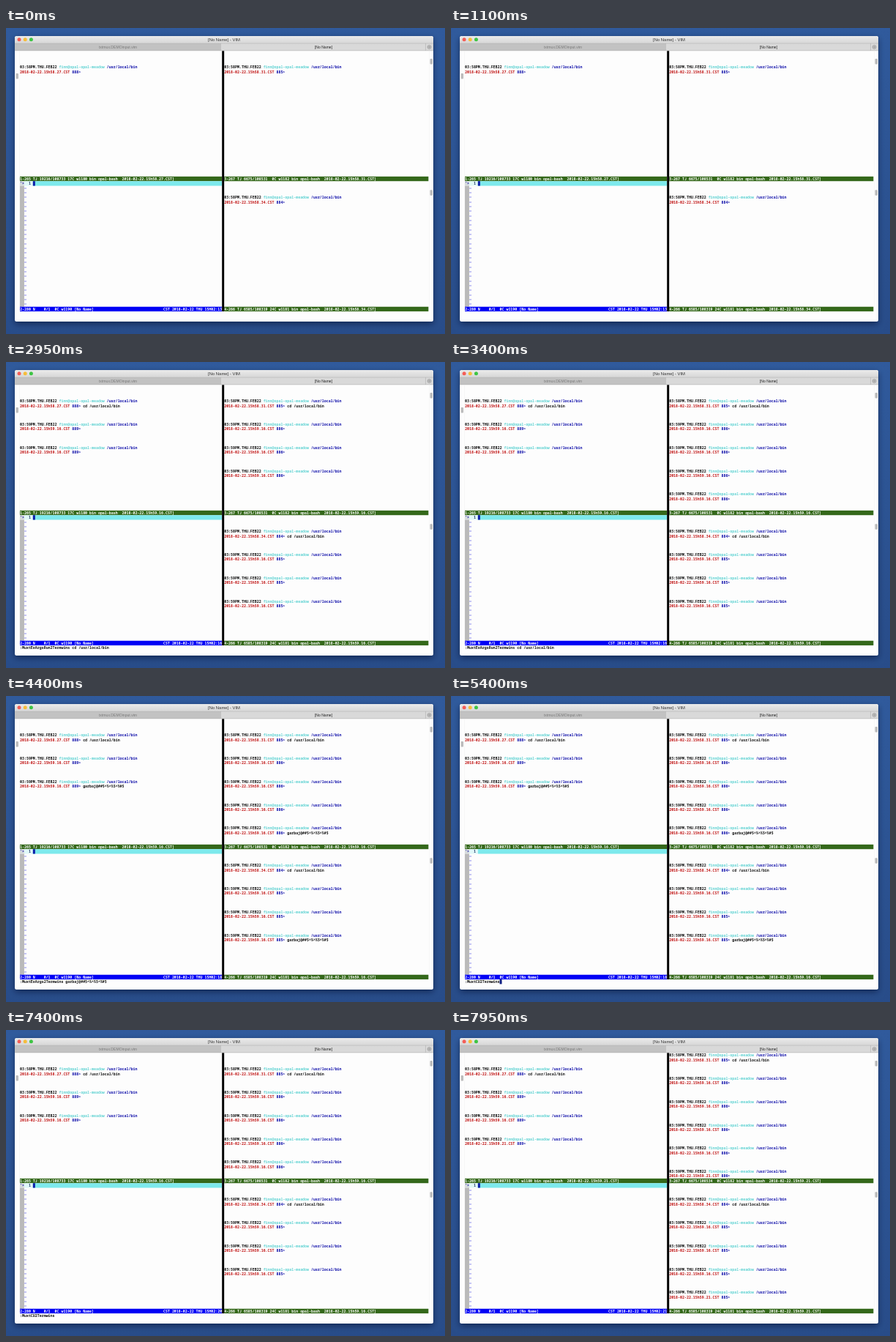
Animation, 600 px wide and 418 px high, one loop 8000 ms. Source, as an HTML page with a canvas:

```html
<!DOCTYPE html>
<html lang="en">
<head>
<meta charset="utf-8">
<title>Editor with terminal panes</title>
<style>
  html, body { margin: 0; width: 100%; height: 100%; overflow: hidden; background: #2b5191; }
  canvas { display: block; width: 600px; height: 418px; }
</style>
</head>
<body>
<canvas id="stage"></canvas>
<script>
const LOOP = 8000, W = 600, H = 418;
const CW = 2.97, RH = 6.354, X0 = 19, Y0 = 31.3;
const MONO = '"Noto Sans Mono", "DejaVu Sans Mono", monospace';
const SANS = '"Liberation Sans", Inter, sans-serif';
const GREEN = '#34681a', BLUE = '#0000f5', NAVY = '#0a0aa8', RED = '#c01212';
const PAPER = '#fdfdfd', INK = '#111';
const SPLIT = 93, RIGHT = 94, COLS = 188;
const EDIT_ROW = 28, BASE_ROW = 55, CMD_ROW = 56;
const USER = 'finn@opal-opal-meadow', SHELL = 'opal-bash', DIR = '/usr/local/bin';
const JUNK = 'garbaj@##$^%^%$^%#$';
const SENT = 2300, JUNK_ON = 4350, JUNK_OFF = 6100, ENTER = 7750;

// added: when each further prompt appears
const panes = [
  { col: 0, top: 0, bar: 27, num: 888, sec: 27, added: [2650, 2850, ENTER],
    info: () => '1-265 TJ 19216/108733 17C w1180' },
  { col: RIGHT, top: 0, bar: 27, num: 885, sec: 31, added: [2650, 2800, 2950, 3100, ENTER],
    info: t => `3-267 TJ 6675/${t < ENTER ? 108531 : 108534}  0C w1182` },
  { col: RIGHT, top: 28, bar: 55, num: 884, sec: 34, added: [2650, 2800, 2950, ENTER],
    info: () => '4-266 TJ 6585/108319 24C w1181' }
];

const commands = [
  { text: ':MuxtExArgsRun2Termwins cd ' + DIR, start: 1400, typed: 2200, run: SENT },
  { text: ':MuxtExArgs2Termwins ' + JUNK, start: 3550, typed: 4250, run: JUNK_ON },
  { text: ':MuxtCU2Termwins', start: 4850, typed: 5350, run: JUNK_OFF }
];

const clock = [[0, 13], [SENT, 16], [JUNK_ON, 18], [JUNK_OFF, 20], [ENTER, 21]];

const canvas = document.getElementById('stage');
const ctx = canvas.getContext('2d');
const dpr = window.devicePixelRatio || 1;
canvas.width = W * dpr;
canvas.height = H * dpr;

const colX = c => X0 + c * CW;
const rowY = r => Y0 + r * RH;

function box(x, y, w, h, color) {
  ctx.fillStyle = color;
  ctx.fillRect(x, y, w, h);
}

function cells(col, row, n, color, rows = 1) {
  box(colX(col), rowY(row), n * CW, rows * RH, color);
}

// Large font scaled down keeps the character grid exact.
function put(text, col, row, color) {
  ctx.save();
  ctx.translate(colX(col), rowY(row) + 4.95);
  ctx.scale(0.1, 0.1);
  ctx.font = `bold 49.5px ${MONO}`;
  ctx.textAlign = 'left';
  ctx.fillStyle = color;
  ctx.fillText(text, 0, 0);
  ctx.restore();
}

function label(text, x, y, size, color) {
  ctx.save();
  ctx.translate(x, y);
  ctx.scale(0.1, 0.1);
  ctx.font = `${size * 10}px ${SANS}`;
  ctx.textAlign = 'center';
  ctx.fillStyle = color;
  ctx.fillText(text, 0, 0);
  ctx.restore();
}

function disc(x, y, r, color) {
  ctx.fillStyle = color;
  ctx.beginPath();
  ctx.arc(x, y, r, 0, Math.PI * 2);
  ctx.fill();
}

function pill(x, y, w, h, r, color) {
  ctx.fillStyle = color;
  ctx.beginPath();
  ctx.roundRect(x, y, w, h, r);
  ctx.fill();
}

function fade(y0, y1, from, to) {
  const g = ctx.createLinearGradient(0, y0, 0, y1);
  g.addColorStop(0, from);
  g.addColorStop(1, to);
  return g;
}

function drawWindow() {
  box(0, 0, W, H, fade(0, H, '#305a9c', '#284c89'));
  ctx.save();
  ctx.shadowColor = 'rgba(0, 10, 40, 0.55)';
  ctx.shadowBlur = 9 * dpr;
  ctx.shadowOffsetY = 3 * dpr;
  pill(12, 11, 572, 390, 2.5, PAPER);
  ctx.restore();

  pill(12, 11, 572, 10.5, [2.5, 2.5, 0, 0], fade(11, 21, '#ebebeb', '#d6d6d6'));
  ['#f45e57', '#f6bd3b', '#3ec544'].forEach((c, i) => disc(18 + i * 8.2, 15.8, 2.5, c));
  label('[No Name] - VIM', 298, 17.8, 5.9, '#333');

  box(12, 21, 281, 10, '#c2c2c2');
  box(293, 21, 291, 10, '#d9d9d9');
  box(12, 20.8, 572, 0.5, '#adadad');
  box(12, 30.6, 572, 0.6, '#b0b0b0');
  box(293, 21, 0.5, 10, '#a8a8a8');
  box(573.5, 21, 0.5, 10, '#a8a8a8');
  label('txtmux.DEMOinput.vim', 153, 27.8, 5.1, '#777');
  label('[No Name]', 434, 27.8, 5.05, '#222');

  ctx.strokeStyle = '#777';
  ctx.lineWidth = 0.6;
  ctx.beginPath();
  ctx.arc(578.5, 26, 2.4, 0, Math.PI * 2);
  ctx.moveTo(577.1, 26);
  ctx.lineTo(579.9, 26);
  ctx.moveTo(578.5, 24.6);
  ctx.lineTo(578.5, 27.4);
  ctx.stroke();

  box(18.4, 31.3, 0.4, 355, '#ececec');
  box(578, 31.3, 0.4, 355, '#ececec');
  pill(13.5, 62, 3.5, 7.5, 1, '#bdbdbd');
  pill(579.5, 42, 3.5, 7.5, 1, '#bdbdbd');
  pill(579.5, 221.3, 3.5, 7.5, 1, '#bdbdbd');
}

function drawPrompt(col, row, minute, sec, num, typed) {
  put(`03:${minute}PM.THU.FEB22`, col, row, INK);
  put(USER, col + 18, row, '#62d3d3');
  put(DIR, col + 40, row, NAVY);
  put(`2018-02-22.15h${minute}.${sec}.CST`, col, row + 1, RED);
  put(num + '>', col + 24, row + 1, NAVY);
  if (typed) put(typed, col + 29, row + 1, INK);
}

function drawPane(p, t) {
  const shown = p.added.filter(at => t >= at);
  const scroll = shown.length > 4 ? 3 : 0;
  const first = p.top + 3 - scroll;
  const junk = t >= JUNK_ON && t < JUNK_OFF;

  drawPrompt(p.col, first, 58, p.sec, p.num, t >= SENT ? 'cd ' + DIR : '');
  shown.forEach((at, i) => {
    const last = i === shown.length - 1;
    drawPrompt(p.col, first + 5 * (i + 1), 59, at === ENTER ? 21 : 16, p.num + 1,
      last && junk ? JUNK : '');
  });

  const stamp = !shown.length ? '58.' + p.sec : t < ENTER ? '59.16' : '59.21';
  cells(p.col, p.bar, p.col ? COLS - RIGHT : SPLIT, GREEN);
  put(`${p.info(t)} bin ${SHELL}  2018-02-22.15h${stamp}.CST]`, p.col, p.bar, '#fff');
}

function drawEditor(t, typing) {
  cells(0, EDIT_ROW, 2, '#d6dcdc');
  cells(0, EDIT_ROW + 1, 2, '#bababa', BASE_ROW - EDIT_ROW - 1);
  cells(2, EDIT_ROW, 4, '#e0f8f8');
  cells(6, EDIT_ROW, SPLIT - 6, '#7de9ec');
  put("'>", 0, EDIT_ROW, NAVY);
  put('1', 4, EDIT_ROW, '#223a66');
  if (!typing) cells(6, EDIT_ROW, 1, '#0a1aa8');
  for (let r = EDIT_ROW + 1; r < BASE_ROW; r++) put('~', 2, r, '#2020d8');

  const sec = clock.filter(c => t >= c[0]).pop()[1];
  cells(0, BASE_ROW, SPLIT, BLUE);
  put('2-280 N    0/1  0C w1190 [No Name]', 0, BASE_ROW, '#fff');
  put('CST 2018-02-22 THU 15H02:' + sec, 66, BASE_ROW, '#fff');
}

function drawCommand(cmd, t, typing) {
  if (!cmd || t >= ENTER) return;
  const part = Math.min(1, (t - cmd.start) / (cmd.typed - cmd.start));
  const n = Math.max(1, Math.floor(part * cmd.text.length));
  put(cmd.text.slice(0, n), 0, CMD_ROW, INK);
  if (typing) cells(n, CMD_ROW, 1, '#0a1a80');
}

function draw(t) {
  const cmd = commands.filter(c => t >= c.start).pop();
  const typing = !!cmd && t < cmd.run;
  ctx.setTransform(dpr, 0, 0, dpr, 0, 0);
  drawWindow();
  panes.forEach(p => drawPane(p, t));
  drawEditor(t, typing);
  cells(SPLIT, 0, 1, '#000', BASE_ROW + 1);
  drawCommand(cmd, t, typing);
}

const begun = performance.now();
function tick() {
  draw((performance.now() - begun) % LOOP);
  requestAnimationFrame(tick);
}
tick();
</script>
</body>
</html>
```
